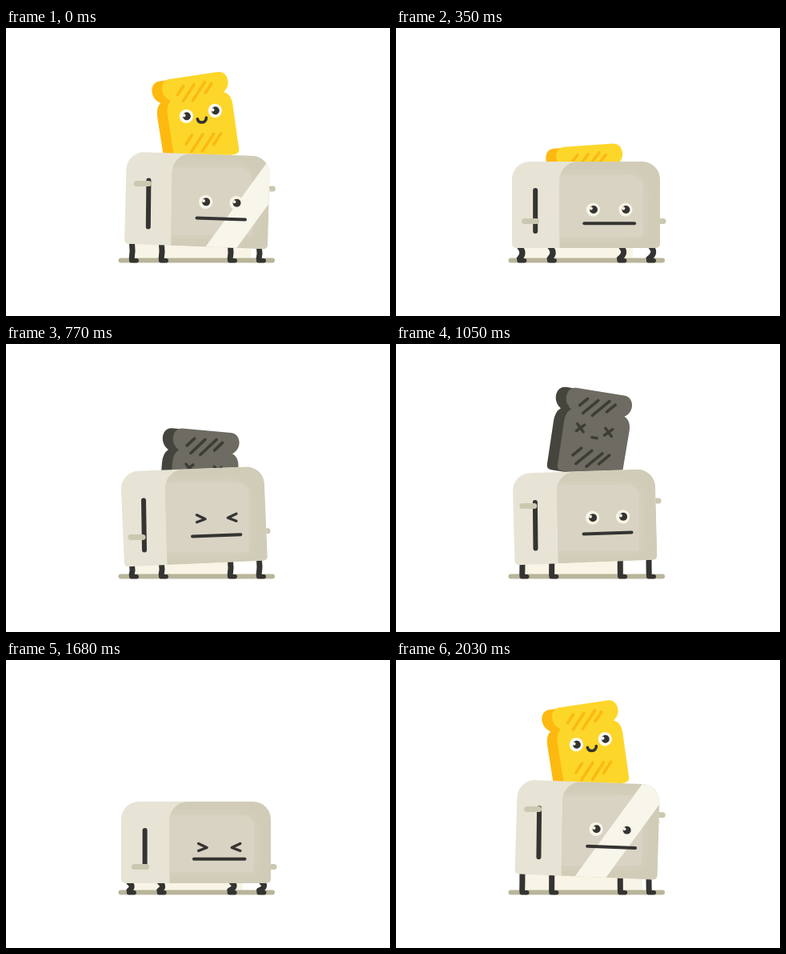
An HTML page with a canvas that plays this animation: 480x360 px, repeating every 2.1 s.

```html
<!DOCTYPE html>
<html lang="en">
<head>
<meta charset="utf-8">
<title>Toaster</title>
<style>
html, body { margin: 0; width: 100%; height: 100%; overflow: hidden; background: #fff; }
canvas { display: block; filter: url(#rough); }
svg { position: absolute; width: 0; height: 0; }
</style>
</head>
<body>
<canvas id="stage" width="480" height="360"></canvas>
<svg><filter id="rough" x="0" y="0" width="1" height="1" color-interpolation-filters="sRGB">
  <feTurbulence type="fractalNoise" baseFrequency="0.15" numOctaves="1" seed="4" result="n"/>
  <feDisplacementMap in="SourceGraphic" in2="n" scale="1.6" xChannelSelector="R" yChannelSelector="G"/>
</filter></svg>
<script>
const ctx = document.getElementById('stage').getContext('2d');
const LOOP = 2100, STEP = 70, HALF = LOOP / 2;
const INK = '#343432', CREAM = '#f8f5e6', KNOB = '#cbc8b1';
const SIDE = '#e7e4d6', FACE = '#d0ccb7', PANEL = '#d9d3c4';

// time, half width, lean, top, bottom, tilt, lever y, eye y
const POSES = [
  [0, 89.5, 3, 157.5, 273, 6, 194, 218],
  [350, 92.5, 0, 167, 275, 0, 241, 227],
  [630, 93.5, 0, 177, 279, 0, 258, 234],
  [770, 89.5, -5, 156, 274.5, -7, 241, 217.5],
  [980, 88.5, -4, 155, 271, -6.5, 194, 212.5],
  [1050, 89, -3, 159, 273, -6, 202, 216.5],
  [1400, 90, 0, 165, 275, 0, 237, 227],
  [1680, 93.5, 0, 177, 279, 0, 258, 234],
  [1820, 89.5, 4, 156, 274, 6, 239, 217],
  [2030, 89, 3.5, 152.5, 271, 6.5, 186, 212]
];

// toast centre height while popping up, one entry per step
const RISE = [228, 205, 154, 121, 105, 100.5, 105];

// grill marks: centre x, centre y, length
const MARKS = [
  [-18, -30, 13], [-8.5, -25.5, 25], [4.5, -25.5, 28], [17, -27.5, 14],
  [-16.5, 32.5, 14], [-7, 38, 26], [6.5, 39.5, 26], [18.5, 37, 17]
];

const clamp = (v, a, b) => Math.min(b, Math.max(a, v));
const mix = (a, b, k) => a + (b - a) * k;

function poseKey(i) {
  const n = POSES.length, p = POSES[(i + n) % n].slice();
  p[0] += Math.floor(i / n) * LOOP;
  return p;
}

// monotone cubic between poses
function poseAt(t) {
  let i = 0;
  while (poseKey(i + 1)[0] <= t) i++;
  const [a, b, c, d] = [-1, 0, 1, 2].map(o => poseKey(i + o));
  const span = c[0] - b[0], u = (t - b[0]) / span;
  const slope = (p, q, j) => (q[j] - p[j]) / (q[0] - p[0]);
  const join = (m, n) => m * n > 0 ? 2 * m * n / (m + n) : 0;
  const v = b.map((_, j) => {
    const s = slope(b, c, j);
    const m0 = join(slope(a, b, j), s) * span, m1 = join(s, slope(c, d, j)) * span;
    const u2 = u * u, u3 = u2 * u;
    return (2 * u3 - 3 * u2 + 1) * b[j] + (u3 - 2 * u2 + u) * m0
      + (3 * u2 - 2 * u3) * c[j] + (u3 - u2) * m1;
  });
  const [, half, lean, top, bot, tilt, lever, eye] = v;
  return {
    half, lean, top, bot, tilt, lever, eye,
    topAt: x => top + tilt * (x - 237.5) / 180,
    botAt: x => bot + tilt * 1.15 * (x - 237.5) / 180
  };
}

function line(pts, width, color) {
  ctx.beginPath();
  pts.forEach(([x, y], i) => i ? ctx.lineTo(x, y) : ctx.moveTo(x, y));
  ctx.lineWidth = width;
  ctx.strokeStyle = color;
  ctx.stroke();
}

function dot(x, y, r, color) {
  ctx.beginPath();
  ctx.arc(x, y, r, 0, 7);
  ctx.fillStyle = color;
  ctx.fill();
}

function eye(x, y, white) {
  dot(x, y, 8.6, white);
  dot(x + 0.5, y, 5, INK);
  dot(x - 2.6, y - 1.4, 2, white);
}

// rounded polygon, points are [x, y, radius]
function shape(pts) {
  const n = pts.length, [l, f] = [pts[n - 1], pts[0]];
  ctx.beginPath();
  ctx.moveTo((l[0] + f[0]) / 2, (l[1] + f[1]) / 2);
  pts.forEach(([x, y, r], i) => {
    const q = pts[(i + 1) % n];
    ctx.arcTo(x, y, q[0], q[1], r);
  });
  ctx.closePath();
}

function slice(color) {
  ctx.beginPath();
  ctx.moveTo(-30, -46);
  ctx.lineTo(31, -46);
  ctx.bezierCurveTo(44, -46, 47, -27, 35, -20);
  ctx.bezierCurveTo(41, -18, 44, -11, 44, -4);
  ctx.lineTo(43.5, 53);
  ctx.quadraticCurveTo(43.5, 59, 37, 59);
  ctx.lineTo(-32, 59);
  ctx.quadraticCurveTo(-38, 59, -38, 53);
  ctx.lineTo(-38.5, -2);
  ctx.quadraticCurveTo(-38.5, -14, -32, -19);
  ctx.bezierCurveTo(-45, -27, -42, -46, -30, -46);
  ctx.closePath();
  ctx.fillStyle = color;
  ctx.fill();
}

function toast(x, y, deg, burnt) {
  const [front, crust, mark] = burnt
    ? ['#6d6b62', '#45453d', '#3d3c35'] : ['#fdd62a', '#fdb910', '#fbb914'];
  ctx.save();
  ctx.translate(x, y);
  ctx.rotate(deg * Math.PI / 180);
  ctx.save();
  ctx.translate(-13, 1);
  slice(crust);
  ctx.restore();
  slice(front);
  for (const [mx, my, len] of MARKS) {
    const dx = len * 0.33, dy = len * 0.37;
    line([[mx - dx, my + dy], [mx + dx, my - dy]], 3.6, mark);
  }
  if (burnt) {
    for (const ex of [-17, 18.5]) {
      line([[ex - 4.5, -2], [ex + 4.5, 7]], 3.4, mark);
      line([[ex + 4.5, -2], [ex - 4.5, 7]], 3.4, mark);
    }
    line([[-1, 12], [5.5, 12]], 3.4, mark);
  } else {
    eye(-15.5, 3, '#fffdf6');
    eye(21, 1.5, '#fffdf6');
    ctx.beginPath();
    ctx.arc(3.3, 8, 5.6, 0.1, Math.PI - 0.1);
    ctx.lineWidth = 3.6;
    ctx.strokeStyle = INK;
    ctx.stroke();
  }
  ctx.restore();
}

function drawToast(t, p) {
  // steps since the last squash; each half of the loop lifts one slice
  const n = ((t - 630 + LOOP) % LOOP) / STEP;
  const burnt = n < 15, k = n % 15, f = k - 6;
  const drop = burnt ? 4 * f + 4 * f * f : 5.5 * f + 2.4 * f * f;
  const y = k < 6 ? RISE[Math.floor(k)] : RISE[6] + drop;
  const high = clamp((193 - y) / 88, 0, 1);
  ctx.save();
  ctx.beginPath();
  ctx.rect(0, 0, 480, p.top + 40);
  ctx.clip();
  toast(burnt ? mix(245, 247.7, high) : mix(243, 240.3, high), y,
    burnt ? mix(2, 9, high) : -mix(4, 8.5, high), burnt);
  ctx.restore();
}

function drawGround(p) {
  ctx.fillStyle = CREAM;
  ctx.fillRect(160, p.bot - 6, 136 + p.lean * 3.5, 296 - p.bot);
  line([[143.5, 290.5], [333, 290.5]], 6, '#b9b59b');
}

function drawLegs(p) {
  const bend = clamp((p.half - 89) * 1.5, 0, 4);
  for (const x0 of [157.5, 194.5, 280.5, 316.5]) {
    const x = 237.5 + (x0 - 237.5) * p.half / 89.5, y = p.botAt(x) - 1;
    const foot = mix(x0, x, 0.5) - bend * 0.4;
    ctx.beginPath();
    ctx.moveTo(x, y);
    ctx.quadraticCurveTo(x + bend * 1.6, (y + 289) / 2, foot, 288);
    ctx.lineWidth = 7;
    ctx.strokeStyle = INK;
    ctx.stroke();
    line([[foot - 0.5, 290.8], [foot + 6, 290.8]], 5.5, INK);
  }
}

function drawBody(t, p) {
  const { half, lean, topAt, botAt } = p;
  const L = 237.5 - half, R = 237.5 + half, TL = L + lean, TR = R + lean;

  const ky = p.lever + 0.5 + p.tilt * 1.1;
  line([[TR - 10, ky], [R + 4 + lean * 0.8, ky]], 7, KNOB);

  shape([[TL, topAt(TL), 22], [TR, topAt(TR), 22], [R, botAt(R), 5], [L, botAt(L), 5]]);
  ctx.fillStyle = SIDE;
  ctx.fill();

  ctx.save();
  ctx.clip();
  const d1 = 204.5 + lean * 1.2, d0 = 204.5 + lean * 0.6;
  shape([[d1, topAt(d1), 23], [TR, topAt(TR), 22], [R, botAt(R), 5], [d0, botAt(d0), 0]]);
  ctx.fillStyle = FACE;
  ctx.fill();
  ctx.clip();

  // paler panel fading into the rim
  const pt = p.top + 17, pb = p.bot - 14, pr = R - 21 + lean * 0.5;
  ctx.save();
  ctx.shadowColor = PANEL;
  ctx.shadowBlur = 16;
  shape([[190, pt, 0], [pr, pt, 14], [pr, pb, 4], [190, pb, 0]]);
  ctx.fillStyle = PANEL;
  ctx.fill();
  ctx.restore();

  // passing shine
  const late = t > HALF ? t - LOOP : t;
  const x = 249 + late * 0.4, y0 = 282, y1 = 142, run = 0.73;
  const at = (off, y) => [x + off + run * (274 - y), y, 0];
  shape([at(0, y0), at(0, y1), at(40, y1), at(40, y0)]);
  ctx.fillStyle = '#f8f6ea';
  ctx.fill();
  ctx.restore();

  // slot and lever
  const slot = 176 - (half - 89.5) * 0.6;
  line([[slot + lean * 0.8, topAt(L) + 36], [slot + lean * 0.6, botAt(L) - 21]], 6, INK);
  const lx = 174.5 + lean * 0.9;
  line([[lx - 14, p.lever + 0.5], [lx + 1, p.lever + 0.5]], 7, KNOB);
}

function drawFace(t, p) {
  const mid = 266.7 + p.lean * 0.7, gap = 19 + (p.half - 89) * 0.35;
  const at = (x, y) => [x, y + (x - mid) * p.tilt / 180];
  const k = t % HALF, shut = t >= 560 && (k >= 560 && k < 910);
  for (const s of [-1, 1]) {
    const [x, y] = at(mid + s * gap, p.eye);
    if (shut) line([[x + s * 5.5, y - 4.5], [x - s * 5, y + 0.5], [x + s * 5.5, y + 4.5]], 3.4, INK);
    else eye(x, y, CREAM);
  }
  const my = p.eye + 17.3 + (p.bot - p.top - 108) * 0.43;
  const w = 30 + (p.half - 89) * 0.4;
  line([at(mid - w, my), at(mid + w, my)], 4, INK);
}

function draw(t) {
  ctx.fillStyle = '#fff';
  ctx.fillRect(0, 0, 480, 360);
  ctx.lineCap = ctx.lineJoin = 'round';
  const p = poseAt(t);
  drawGround(p);
  drawLegs(p);
  drawToast(t, p);
  drawBody(t, p);
  drawFace(t, p);
}

const start = performance.now();
function tick() {
  const t = (performance.now() - start) % LOOP;
  draw(Math.floor(t / STEP) * STEP);
  requestAnimationFrame(tick);
}
tick();
</script>
</body>
</html>
```
